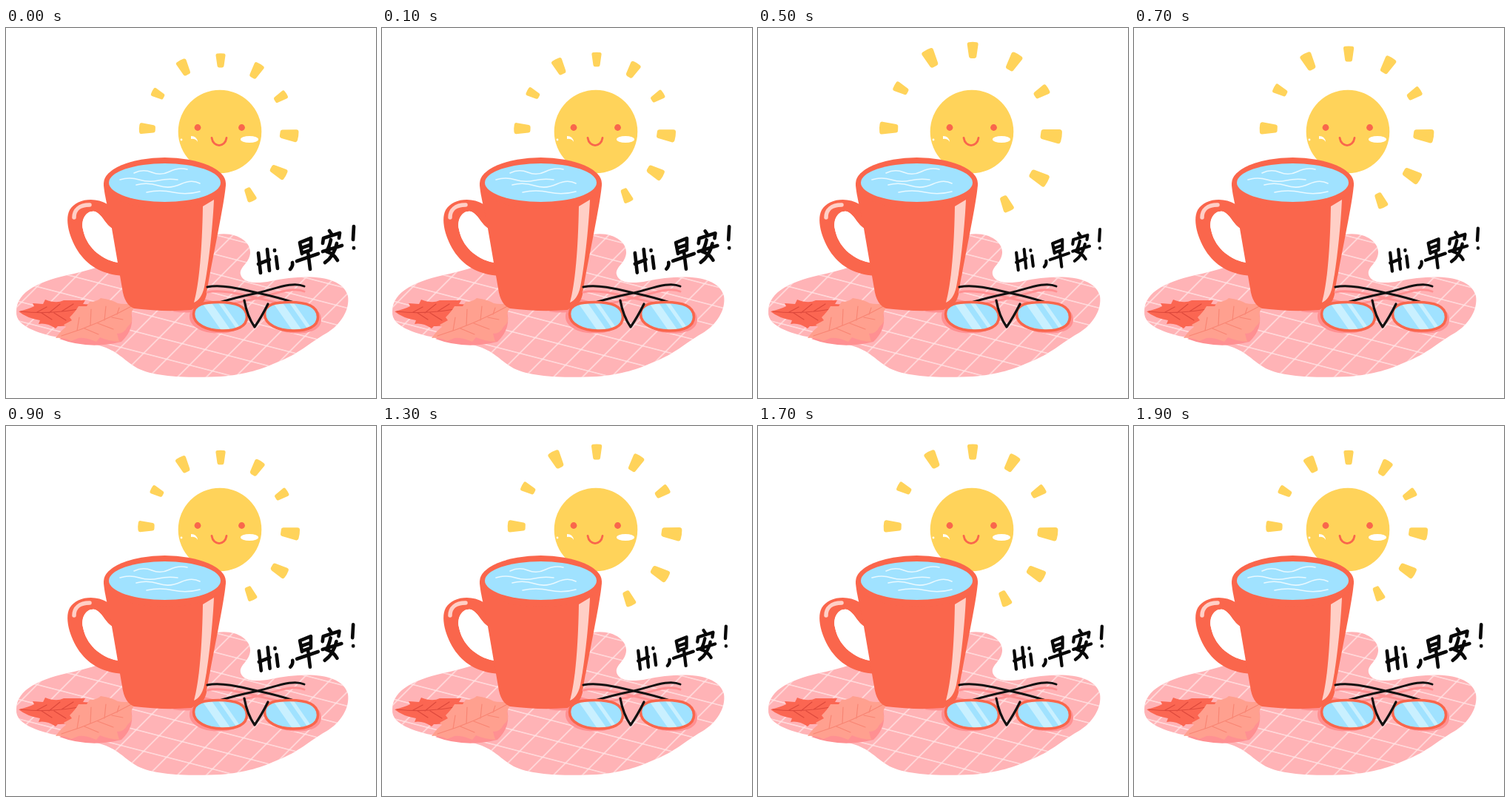
These frames come from a looping animation (500 px wide and 500 px high, 2100 ms). An HTML page:

```html
<!DOCTYPE html>
<html lang="zh">
<head>
<meta charset="utf-8">
<title>Hi, 早安!</title>
<style>
  @property --swell { syntax: "<number>"; inherits: true; initial-value: 0; }
  html, body { margin: 0; width: 100%; height: 100%; overflow: hidden; background: #fff; }
  svg { display: block; width: 100%; height: 100%; animation: pulse 2100ms step-end infinite; }
  .rays { transform-origin: 289px 140px; transform: scale(calc(1 + .145 * var(--swell))); }
  .greeting { transform-origin: 406px 300px; transform: scale(calc(1 - .125 * var(--swell))); }
  .line { fill: none; stroke-linecap: round; stroke-linejoin: round; }
  /* Rest, small, medium and full swell, held between hard changes. */
  @keyframes pulse {
    0% { --swell: 0; }
    4.762%, 42.857%, 90.476% { --swell: .1; }
    14.286%, 33.333%, 61.905%, 80.952% { --swell: .64; }
    23.81%, 71.429% { --swell: 1; }
    100% { --swell: .1; }
  }
</style>
</head>
<body>
<svg viewBox="0 0 500 500" role="img" aria-label="Hi, 早安!">
  <defs>
    <pattern id="checks" width="1" height="1" patternUnits="userSpaceOnUse" patternTransform="matrix(31 8 -21 21 171 396)">
      <path d="M0 .5H1M.5 0V1" stroke="#fff" stroke-width=".05" opacity=".65"/>
    </pattern>
    <path id="cloth" d="M14 383C14 356 46 341 92 332C155 318 220 280 285 279C312 275 331 289 330 304C329 318 315 323 317 333C320 345 338 346 358 342C400 333 454 332 462 362C465 380 453 401 432 413C408 427 396 440 368 451C346 461 325 468 290 471C250 473 202 472 178 460C156 447 153 437 126 429C95 421 60 419 36 408C22 402 13 394 14 383Z"/>
    <path id="ray" d="M-4 -7Q0 -7.600 4 -7L2 7H-2Z"/>
    <path id="lens" d="M-36 -3C-36 -17 -20 -19 -2 -19C20 -19 36 -14 36 1C36 14 22 19.500 4 19.500C-18 20 -36 11 -36 -3Z"/>
    <clipPath id="lensClip"><use href="#lens"/></clipPath>
    <path id="temples" class="line" d="M272 350C290 346 315 352 340 358Q368 364 389 371M403 349C388 342 365 352 340 358Q311 364 288 371"/>
  </defs>

  <g fill="#ffd35a">
    <circle cx="289" cy="140" r="56.3"/>
    <g class="rays" stroke="#ffd35a" stroke-width="5" stroke-linejoin="round">
      <use href="#ray" transform="translate(290 44)"/>
      <use href="#ray" transform="translate(240.5 53.5) rotate(-27) scale(1.14)"/>
      <use href="#ray" transform="translate(205.5 89.5) rotate(-62) scale(.92)"/>
      <use href="#ray" transform="translate(191 136) rotate(-88) scale(1.14)"/>
      <use href="#ray" transform="translate(338 58) rotate(31) scale(1.12)"/>
      <use href="#ray" transform="translate(371 93.5) rotate(58) scale(.95)"/>
      <use href="#ray" transform="translate(382.5 144.5) rotate(98) scale(1.3)"/>
      <use href="#ray" transform="translate(368 194) rotate(119) scale(1.18)"/>
      <use href="#ray" transform="translate(329.5 225) rotate(155)"/>
    </g>
  </g>
  <g fill="#f9664c">
    <circle cx="259" cy="134.500" r="4.4"/>
    <circle cx="318.500" cy="134.500" r="4.4"/>
    <path class="line" d="M278 148.500C280 162 296 162 298 148.500" stroke="#f9664c" stroke-width="2.8"/>
  </g>
  <g fill="#fff">
    <ellipse cx="329" cy="150.5" rx="12" ry="4.5"/>
    <path d="M250 146Q258 146 259 154Q256 149 250 150Z"/>
    <circle cx="237" cy="151" r="1.4"/>
  </g>

  <use href="#cloth" fill="#ffb3b6"/>
  <use href="#cloth" fill="url(#checks)"/>

  <!-- Leaves -->
  <path d="M72 420Q112 435 156 424Q176 405 168 380Z" fill="#ff9092"/>
  <path d="M17 383Q30 380 38 376L36 372L50 373L53 367Q68 373 78 368Q98 368 107 368L104 373L119 374Q104 383 96 395Q86 404 70 403L67 406Q55 398 44 400L46 395Q28 392 17 383Z" fill="#fb6652"/>
  <path class="line" d="M20 383Q65 388 112 377M42 384L55 377M58 385L73 373M75 383L91 373M48 385L62 394M65 385L81 395" stroke="#dd493c" stroke-width="1.2"/>
  <path d="M67 419Q74 409 81 404L78 401L89 395L86 391Q94 383 98 376L109 376L113 370Q123 370 128 365Q143 367 151 372Q166 375 178 369L180 372Q170 378 169 388Q173 397 164 404Q160 413 150 413L153 424Q138 423 127 418L122 424Q108 418 98 419L88 423Q78 418 67 419Z" fill="#ffa08f"/>
  <path class="line" d="M75 416Q125 401 177 372M96 409L99 391M114 402L115 380M133 395L135 376M150 387L153 378M106 406L125 414M124 399L145 407M143 391L158 394" stroke="#f88573" stroke-width="1.2"/>

  <!-- Cup -->
  <path d="M225 383Q264 389 290 372L268 366Z" fill="#ff9092"/>
  <path d="M137 238C121 228 95 230 86 246C78 261 88 291 102 308C116 326 138 334 160 335L151 317C126 312 108 294 104 272C101 258 109 246 120 248C131 252 134 267 146 272Z" fill="#fa664c"/>
  <path d="M146 272C134 267 131 252 120 248C109 246 101 258 104 272C108 294 126 312 151 317Z" fill="#fff"/>
  <path d="M132 210C132 223 139 247 142 265L157 352Q160 374 173 379Q214 384 250 381Q267 378 271 360C276 325 297 230 297 210Z" fill="#fa664c"/>
  <ellipse cx="214.5" cy="210" rx="82.5" ry="35" fill="#fa664c"/>
  <ellipse cx="214.5" cy="209" rx="75.5" ry="26" fill="#a0e2ff"/>
  <path class="line" d="M173 196q12-6 24-1t24-1 24-3M154 205q13-4 26 0t26 1 26-1M176 212q15-4 30 1t30-2 26-1M190 222q18-4 36 0t36-1" stroke="#e9f9ff" stroke-width="1.6"/>
  <path d="M266 241L281 232C279 275 273 325 268 350Q264 367 254 371C261 346 265 300 266 241Z" fill="#ffcfc6"/>
  <path class="line" d="M92 256C92 246 99 239 113 239" stroke="#ffcfc6" stroke-width="5.5"/>

  <!-- Glasses -->
  <g fill="#ff9092">
    <use href="#lens" x="284" y="393"/>
    <use href="#lens" x="390" y="393"/>
    <use href="#temples" y="7" stroke="#ff9092" stroke-width="3"/>
  </g>
  <use href="#temples" stroke="#111" stroke-width="3"/>
  <g id="glass" transform="translate(289.5 389.5)">
    <use href="#lens" fill="#a0e2ff"/>
    <path d="M-26 -20H-13L15 20H2ZM-4 -20H2L30 20H24Z" fill="#c9f0ff" clip-path="url(#lensClip)"/>
    <use href="#lens" fill="none" stroke="#f9664c" stroke-width="3.6"/>
  </g>
  <use href="#glass" x="96"/>
  <path class="line" d="M322 368Q326 390 336 404Q345 391 354 373" stroke="#111" stroke-width="3.2"/>

  <!-- Hand lettering -->
  <g class="greeting line" stroke="#080808" stroke-width="4.7">
    <path d="M341 304L344 331M353 299L356 328M341 319L356 313"/>
    <path d="M365 309L367 325M363 300V301"/>
    <path d="M387 317Q388 322 384 326"/>
    <path d="M397 290L400 305M397 290L412 284L412 299M400 297L411 293M400 304L412 300M393 315L422 305M408 302L411 326"/>
    <path d="M437 274L441 280M428 291L429 284L451 277L450 284M439 286Q437 296 433 302Q443 305 448 314M447 291Q443 309 431 317M428 302L454 294"/>
    <path d="M470 268L469 286M470 297V297.500"/>
  </g>
</svg>
</body>
</html>
```
